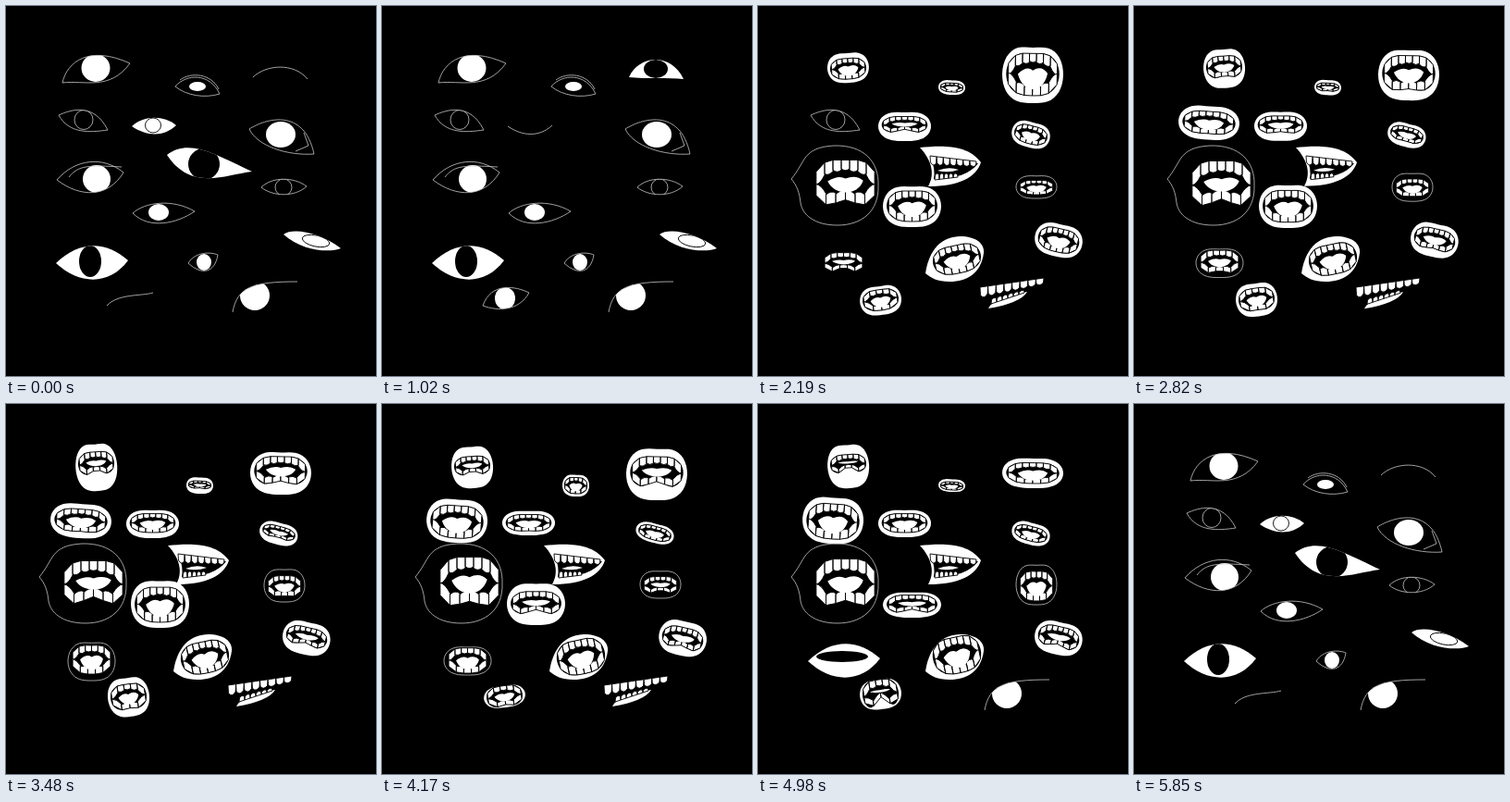
Recreate the animation shown at these times as an HTML page. Size 400 px wide and 400 px high, loop 6 s.

```html
<!DOCTYPE html>
<html lang="en">
<head>
<meta charset="utf-8">
<title>Eyes and mouths</title>
<style>
html, body { margin: 0; width: 100%; height: 100%; overflow: hidden; background: #000; }
svg { display: block; width: 100vw; height: 100vh; background: #000; }
.line { fill: none; stroke: #c8c8c8; stroke-width: .8; }
.teeth { fill: #fff; stroke: #000; stroke-width: .9; stroke-linejoin: round; }
</style>
</head>
<body>
<svg id="stage" viewBox="0 0 400 400"></svg>
<script>
const LOOP = 6000, STEP = 30;
const KEYS = [2190, 3480, 4170, 4980];
const slots = [];
const clamp = v => Math.max(0, Math.min(1, v));
const ramp = (t, a, b) => clamp((t - a) / (b - a));
const lerp = (a, b, k) => a + (b - a) * k;
const mix = (a, b, k) => a.map((v, i) => lerp(v, b[i], k));
const fix = v => v.toFixed(1);
const path = (d, attrs) => `<path d="${d}" ${attrs}/>`;

// lids: left corner, upper controls, right corner, lower controls
// iris: x, y, rx, ry. Mouth keys: lip top, lip bottom, inner top, inner bottom, arch.
function add(from, to, eye, mouth) { slots.push({ from, to, eye, mouth, id: slots.length }); }

add(1380, 5670,
  { lids: [61,83, 66,60, 90,42, 134,62, 112,92, 85,80], iris: [97,67,15.5,15], look: 'ball', blink: 150 },
  { x: [75,120], tilt: -4, n: 6, keys: [[50,83,56,79,0], [42,94,51,78,.5], [45,91,56,78,.5], [43,91,54,76,.75]] });
add(1320, 5580,
  { lids: [183,87, 195,73, 220,72, 231,95, 215,100, 195,97], iris: [207,87,9,5], look: 'ball', extra: 'M188 80C200 71 222 73 230 90' },
  { x: [195,224], tilt: 3, n: 5, keys: [[80,96,83,93,0], [79,97,83,92,.3], [76,100,79,97,0], [81,95,84,93,0]] });
add(1290, 5610,
  { lids: [267,77, 278,53, 312,50, 326,79, 310,77, 285,79], iris: [296,68,13,10], look: 'dark', shut: .4, sleeps: true },
  { x: [264,330], tilt: 1, n: 7, keys: [[43,105,50,97,0], [51,98,56,89,.35], [47,104,56,92,.45], [58,91,63,86,0]] });
add(2400, 5640,
  { lids: [57,118, 70,112, 95,104, 110,134, 90,137, 68,138], iris: [84,123,10,10.5], look: 'ring' },
  { x: [48,114], tilt: 4, n: 7, keys: [[107,145,113,139,0], [107,145,113,139,.1], [102,150,109,145,0], [100,151,107,146,0]] });
add(1140, 5550,
  { lids: [136,130, 150,118, 170,118, 184,129, 170,142, 152,141], iris: [159,129,8.5,8], look: 'whiteRing', shut: 1 },
  { x: [130,187], tilt: 0, n: 7, keys: [[114,146,119,138,.5], [114,145,118,139,0], [115,142,119,138,.1], [114,144,118,139,0]] });
add(1440, 5640,
  { lids: [263,133, 280,122, 322,109, 333,160, 305,162, 272,152], iris: [297,139,16,14], look: 'ball', extra: 'M313 157L327 151L322 137' },
  { x: [274,316], tilt: 15, n: 6, keys: [[125,153,129,149,0], [128,152,132,146,.3], [129,150,132,147,0], [128,152,132,148,0]] });
add(1800, 5400,
  { lids: [55,188, 75,165, 105,162, 127,180, 110,208, 80,207], iris: [98,187,15,15], look: 'ball', extra: 'M68 185C78 172 90 172 125 174' },
  { x: [58,131], tilt: 0, n: 7, outline: 'M36 187C52 168 48 153 82 151C114 150 131 168 130 194C131 222 112 237 86 237C60 237 48 225 46 213C45 202 42 194 36 187Z',
    keys: [[165,219,165,219,.35], [168,220,168,220,.45], [164,222,164,222,.3], [166,222,166,222,.35]] });
add(1080, 5520,
  { lids: [174,161, 198,143, 225,160, 266,179, 235,183, 200,200], iris: [214,171,17,17], look: 'dark' },
  { side: 'profile', pivot: 172 });
add(1530, 5610,
  { lids: [276,196, 288,184, 312,185, 325,195, 312,207, 288,206], iris: [300,196,9,9], look: 'ring' },
  { x: [279,323], tilt: 0, n: 6, thin: true, keys: [[183,208,188,204,0], [178,214,185,209,.15], [180,210,186,206,.5], [173,217,180,213,0]] });
add(1260, 5460,
  { lids: [137,224, 150,212, 180,208, 204,222, 185,235, 155,242], iris: [165,223,11,9], look: 'ball' },
  { x: [135,198], tilt: 0, n: 7, keys: [[194,239,199,233,0], [190,242,197,236,0], [193,239,202,229,.5], [203,231,206,227,.5]] });
add(1350, 5670,
  { lids: [300,247, 310,239, 340,245, 362,262, 350,267, 320,265], iris: [335,254,15,6], look: 'whiteRing', tilt: 12 },
  { x: [299,351], tilt: 13, n: 7, keys: [[235,271,240,266,0], [235,271,241,263,.45], [234,272,241,266,.4], [235,271,240,265,.45]] });
add(1620, 4950,
  { lids: [54,278, 80,253, 108,254, 132,275, 112,302, 80,302], iris: [91,276,12,17], look: 'dark', slit: [91,273,28,6] },
  { x: [67,118], tilt: 0, n: 6, thin: true, keys: [[266,289,266,289,.55], [257,299,260,292,0], [262,293,263,291,0], [262,293,263,291,0]] });
add(1470, 5490,
  { lids: [197,278, 205,265, 222,266, 229,269, 226,288, 212,292], iris: [214,277,8,9], look: 'ball' },
  { x: [187,243], tilt: -12, n: 7, lips: 'M181 289C184 270 193 250 218 249C236 249 245 257 244 267C241 289 226 298 207 298C194 298 187 294 181 289Z',
    keys: [[258,289,258,289,0], [256,291,256,291,0], [254,292,254,292,0], [251,291,251,291,0]] });
add(1590, 5550,
  { lids: [109,324, 118,298, 145,303, 159,310, 148,330, 125,330], iris: [133,316,11,12], look: 'ball', shut: .4, sleeps: true },
  { x: [110,155], tilt: -8, n: 5, keys: [[302,334,306,329,0], [295,338,302,331,.15], [304,328,304,328,.25], [297,330,297,330,.8]] });
add(1680, 4770,
  { lids: [245,331, 250,304, 266,298, 315,298, 300,340, 250,345], iris: [269,313,16,16], look: 'open' },
  { side: 'teeth', pivot: 311 });

function drawEye({ eye, id }, open, slit = 1) {
  const p = eye.lids, [lx, ly, ax, ay, bx, by, rx, ry, cx, cy, dx, dy] = p;
  const closed = mix([ax, ay, bx, by], [dx, dy, cx, cy], eye.shut ?? .6);
  const top = mix(closed, [ax, ay, bx, by], open);
  const low = mix(closed, [dx, dy, cx, cy], open);
  const upper = `M${lx} ${ly}C${top.map(fix)} ${rx} ${ry}`;
  if (open < .03) return path(upper, 'class="line"');
  const shape = `${upper}C${fix(low[2])} ${fix(low[3])} ${fix(low[0])} ${fix(low[1])} ${lx} ${ly}Z`;
  const [ix, iy, iw, ih] = eye.slit ? mix(eye.slit, eye.iris, slit) : eye.iris;
  const iris = attrs => `<ellipse cx="${ix}" cy="${iy}" rx="${iw}" ry="${ih}" transform="rotate(${eye.tilt || 0} ${ix} ${iy})" ${attrs}/>`;
  const white = eye.look === 'dark' || eye.look === 'whiteRing';
  const irisStyle = {
    ball: 'fill="#fff"', open: 'fill="#fff"', dark: 'fill="#000"',
    ring: 'class="line"', whiteRing: 'fill="none" stroke="#000" stroke-width=".9"'
  }[eye.look];
  const lid = white ? path(shape, 'fill="#fff"') : '';
  const edge = white ? '' : path(eye.look === 'open' ? upper : shape, 'class="line"');
  const extra = eye.extra && open > .8 ? path(eye.extra, 'class="line"') : '';
  return `<clipPath id="lid${id}">${path(shape, '')}</clipPath>${lid}` +
    `<g clip-path="url(#lid${id})">${iris(irisStyle)}</g>${edge}${extra}`;
}

// Height of a rounded edge at u in -1..1, dented in the middle by dip.
const arc = (u, h, dip, power = 3) =>
  h * Math.sqrt(Math.max(0, 1 - Math.abs(u) ** power)) * (1 - dip * Math.cos(u * Math.PI / 2) ** 4);

function blob(cx, cy, w, h, topDip, lowDip) {
  const pts = [];
  for (let i = 0; i <= 48; i++) {
    const a = Math.PI * (1 + i / 24), u = Math.cos(a), upper = i < 24;
    pts.push(`${fix(cx + u * w)} ${fix(cy + (upper ? -1 : 1) * arc(u, h, upper ? topDip : lowDip))}`);
  }
  return `M${pts.join('L')}Z`;
}

function teethRow(cx, cy, w, h, dip, n, dir) {
  let d = '';
  for (let i = 0; i < n; i++) {
    const u0 = -.92 + 1.84 * i / n, u1 = u0 + 1.84 / n, mid = (u0 + u1) / 2;
    const depth = h * (.42 + .22 * Math.abs(mid)) * (1 - dip * .3);
    const x0 = fix(cx + u0 * w), x1 = fix(cx + u1 * w);
    const e0 = cy + dir * arc(u0, h, dip), e1 = cy + dir * arc(u1, h, dip);
    const t0 = fix(e0 - dir * depth * .85), t1 = fix(e1 - dir * depth * .85);
    d += `M${x0} ${fix(e0)}L${x1} ${fix(e1)}L${x1} ${t1}Q${fix(cx + mid * w)} ${fix((e0 + e1) / 2 - dir * depth * 1.15)} ${x0} ${t0}Z`;
  }
  return path(d, 'class="teeth"');
}

// Chewing swings twice between neighbouring poses.
function chew(t, id) {
  let i = 0;
  while (i < 2 && t >= KEYS[i + 1]) i++;
  const span = KEYS[i + 1] - KEYS[i], k = (t - KEYS[i]) / span;
  return { i, k: clamp(k), swing: Math.sin(k * Math.PI * 4) * (id % 2 ? 1 : -1) };
}

function drawMouth({ mouth, id }, t, grow) {
  const { i, k, swing } = chew(t, id);
  if (mouth.side) {
    const art = mouth.side === 'profile' ? profile(swing) : bareTeeth(swing);
    return `<g transform="translate(0 ${mouth.pivot * (1 - grow)}) scale(1 ${grow})">${art}</g>`;
  }
  const smooth = k * k * (3 - 2 * k);
  const [lt, lb, ct, cb, arch] = mix(mouth.keys[i], mouth.keys[i + 1], smooth);
  const [x0, x1] = mouth.x, cx = (x0 + x1) / 2, w = (x1 - x0) / 2;
  const bare = mouth.outline || mouth.lips;
  const lipY = (lt + lb) / 2, cy = (ct + cb) / 2;
  const size = 1 + .13 * swing, h = (cb - ct) / 2 * size;
  const dip = clamp(arch + Math.abs(swing) * .15);
  const cw = w * (bare ? .94 : .87);
  const lipShape = bare || blob(cx, lipY, w, (lb - lt) / 2 * size, .06, 0);
  const lipStyle = mouth.outline || mouth.thin ? 'class="line"' : 'fill="#fff"';
  const lips = mouth.thin && lb - lt - (cb - ct) < 1 ? '' : path(lipShape, lipStyle);
  const low = cy + h * (1 - dip) - h * .3, high = cy - h * .28;
  const a = cw * .56, tall = low - high;
  const tongue = tall < 2 ? '' : path(
    `M${fix(cx - a)} ${fix(high + tall * .3)}Q${fix(cx - a * .4)} ${fix(high - tall * .12)} ${fix(cx)} ${fix(high + tall * .12)}` +
    `Q${fix(cx + a * .6)} ${fix(high - tall * .15)} ${fix(cx + a)} ${fix(high + tall * .25)}` +
    `C${fix(cx + a * .7)} ${fix(low + tall * .25)} ${fix(cx - a * .6)} ${fix(low + tall * .25)} ${fix(cx - a)} ${fix(high + tall * .3)}Z`, 'fill="#fff"');
  const inside = path(blob(cx, cy, cw, h, .06, dip), 'fill="#000"') +
    teethRow(cx, cy, cw, h, .06, mouth.n, -1) + teethRow(cx, cy, cw, h, dip, mouth.n - 1, 1) + tongue;
  const turn = `rotate(${mouth.tilt} ${fix(cx)} ${fix(cy)})`;
  const body = bare ? `${lips}<g transform="${turn}">${inside}</g>` : `<g transform="${turn}">${lips}${inside}</g>`;
  return `<g transform="translate(0 ${fix(lipY * (1 - grow))}) scale(1 ${grow})">${body}</g>`;
}

// Teeth standing along a straight gum line.
function gumLine(x0, y0, x1, y1, n, size, dir) {
  let d = '';
  for (let i = 0; i < n; i++) {
    const xa = lerp(x0, x1, i / n), xb = lerp(x0, x1, (i + 1) / n);
    const ya = lerp(y0, y1, i / n), yb = lerp(y0, y1, (i + 1) / n);
    const s = dir * size * (1 - .45 * i / n);
    d += `M${fix(xa)} ${fix(ya)}L${fix(xb)} ${fix(yb)}L${fix(xb - .5)} ${fix(yb + s * .7)}Q${fix((xa + xb) / 2)} ${fix((ya + yb) / 2 + s * 1.2)} ${fix(xa + .5)} ${fix(ya + s * .7)}Z`;
  }
  return path(d, 'class="teeth"');
}

function profile(swing) {
  const jaw = 2 * swing;
  return path(`M175 153C198 151 226 149 241 169C236 ${185 + jaw} 218 ${195 + jaw} 184 ${195 + jaw}C191 183 189 168 175 153Z`, 'fill="#fff"') +
    path(`M187 164L238 170C230 ${181 + jaw} 214 ${187 + jaw} 190 ${187 + jaw}Q192 177 187 164Z`, 'fill="#000"') +
    gumLine(186, 162, 236, 168, 7, 10, 1) +
    gumLine(191, 188 + jaw, 216, 185 + jaw, 5, 7, -1) +
    path(`M194 ${178 + jaw}Q206 ${173 + jaw} 217 ${177 + jaw}Q206 ${181 + jaw} 194 ${178 + jaw}Z`, 'fill="#fff"');
}

function bareTeeth(swing) {
  const jaw = 2 * swing;
  return gumLine(240, 304, 309, 294, 8, 12, 1) +
    path(`M249 ${327 + jaw}Q256 ${313 + jaw} 291 ${309 + jaw}Q284 ${321 + jaw} 249 ${327 + jaw}Z`, 'fill="#fff"') +
    gumLine(252, 322 + jaw, 288, 310 + jaw, 6, 6, -1);
}

function drawSlot(slot, t) {
  const { from, to, eye } = slot;
  if (t >= from && t < to) {
    const grow = Math.min(ramp(t, from - STEP, from + 120), 1 - ramp(t, to - 120, to));
    return drawMouth(slot, t, Math.max(.02, grow));
  }
  if (t >= to) {
    if (eye.slit) return drawEye(slot, 1, ramp(t, to + 30, to + 150));
    return drawEye(slot, eye.sleeps ? 0 : ramp(t, to, to + 120));
  }
  if (t >= from - 60) return '';
  let open = 1 - ramp(t, from - 210, from - 120);
  if (eye.sleeps) open *= ramp(t, 150, 330);
  if (eye.blink) open *= clamp(Math.abs(t - eye.blink - 90) / 90);
  return drawEye(slot, open);
}

const stage = document.getElementById('stage');
let shown = -1;
function render(now) {
  const t = Math.floor((now % LOOP) / STEP) * STEP;
  if (t !== shown) {
    shown = t;
    stage.innerHTML = slots.map(slot => drawSlot(slot, t)).join('');
  }
}
const start = performance.now();
function tick() {
  render(performance.now() - start);
  requestAnimationFrame(tick);
}
tick();
</script>
</body>
</html>
```
